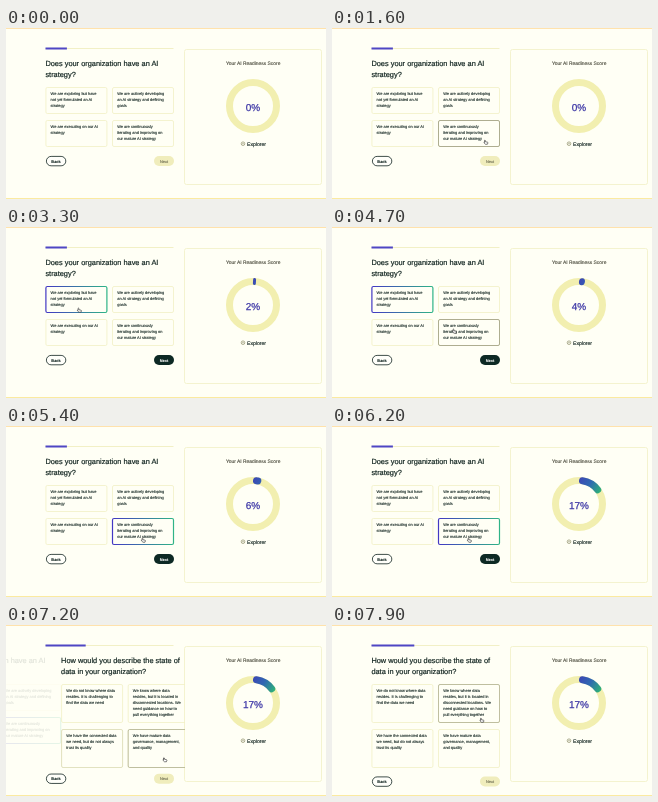
These frames come from a looping animation (320 by 171 pixels, 8 s). An HTML page:

```html
<!DOCTYPE html>
<html lang="en">
<head>
<meta charset="utf-8">
<title>AI readiness quiz</title>
<style>
html, body { margin: 0; width: 100%; height: 100%; overflow: hidden; background: #fffff5; }
svg { display: block; width: 100%; height: 100%; }
text { font-family: "Liberation Sans", Arial, sans-serif; text-rendering: geometricPrecision; }
</style>
</head>
<body>
<svg id="stage" viewBox="0 0 320 171">
  <defs>
    <linearGradient id="edge"><stop stop-color="#4338c4"/><stop offset="1" stop-color="#2fb487"/></linearGradient>
    <linearGradient id="arc" gradientUnits="userSpaceOnUse" x1="247" y1="52" x2="268" y2="65">
      <stop stop-color="#3d45b4"/><stop offset=".5" stop-color="#2f68b2"/><stop offset="1" stop-color="#2eae7c"/>
    </linearGradient>
    <clipPath id="left"><rect width="179" height="171"/></clipPath>
  </defs>
  <g id="scene"></g>
</svg>
<script>
const LOOP = 8000, SLIDE = 128.5, INK = '#10231f', PALE = '#f2f0c6';
const scene = document.getElementById('scene');

const questions = [
  { title: ['Does your organization have an AI', 'strategy?'], height: 27, options: [
    ['We are exploring but have', 'not yet formulated an AI', 'strategy'],
    ['We are actively developing', 'an AI strategy and defining', 'goals'],
    ['We are executing on our AI', 'strategy'],
    ['We are continuously', 'iterating and improving on', 'our mature AI strategy']] },
  { title: ['How would you describe the state of', 'data in your organization?'], height: 39, options: [
    ['We do not know where data', 'resides. It is challenging to', 'find the data we need'],
    ['We know where data', 'resides, but it is located in', 'disconnected locations. We', 'need guidance on how to', 'pull everything together'],
    ['We have the connected data', 'we need, but do not always', 'trust its quality'],
    ['We have mature data', 'governance, management,', 'and quality']] }
];

// Pointer stops: time, x, y
const stops = [
  [600, 298, 134], [1300, 152.5, 112], [1700, 152.5, 112], [2400, 72, 81],
  [3800, 72, 81], [4600, 121, 102], [4800, 121, 102], [5200, 136, 112],
  [6300, 136, 112], [6650, 157.5, 132.5], [7400, 157.5, 132.5], [7900, 148.5, 93]
];

const ramp = (t, a, b) => Math.min(1, Math.max(0, (t - a) / (b - a)));
const ease = u => u * u * (3 - 2 * u);
const slideAt = t => ease(ramp(t, 6900, 7285));

function pointer(t) {
  if (t < stops[0][0]) return null;
  const i = stops.findIndex(s => s[0] > t);
  if (i < 0) return stops[stops.length - 1].slice(1);
  const [a, b] = [stops[i - 1], stops[i]], u = ease(ramp(t, a[0], b[0]));
  return [a[1] + (b[1] - a[1]) * u, a[2] + (b[2] - a[2]) * u];
}

const boxAt = (q, i) => ({ x: i % 2 ? 106 : 39.4, y: 59 + (i > 1 ? q.height + 6 : 0) });

// Share of the last moments the pointer spent over an option
function hover(t, q, i, index) {
  const { x, y } = boxAt(q, i);
  let sum = 0;
  for (let k = 0; k < 4; k++) {
    const p = pointer(t - 40 * k);
    if (!p) continue;
    const dx = p[0] - x - SLIDE * (index - slideAt(t - 40 * k)), dy = p[1] - y;
    if (dx > 0 && dx < 62 && dy > 0 && dy < q.height) sum++;
  }
  return sum / 4;
}

// A thin outline in the text colour gives a medium weight
const text = (x, y, size, str, fill = INK, attrs = '') =>
  `<text x="${x}" y="${y}" font-size="${size}" fill="${fill}" stroke="${fill}" stroke-width="${size * .025}" ${attrs}>${str}</text>`;
const rect = (x, y, w, h, attrs) => `<rect x="${x}" y="${y}" width="${w}" height="${h}" ${attrs}/>`;
const lines = (list, x, y, step, size) => list.map((s, i) => text(x, y + i * step, size, s)).join('');
const MID = 'text-anchor="middle"';

function question(t, index, picked) {
  const q = questions[index], p = slideAt(t), alpha = index ? Math.min(1, p * 1.25) : 1 - p;
  if (!alpha) return '';
  const options = q.options.map((label, i) => {
    const { x, y } = boxAt(q, i);
    const frame = attrs => rect(x + .5, y + .5, 61, q.height - 1, `rx="1.5" fill="none" ${attrs}`);
    const border = i === picked ? frame('stroke="url(#edge)" stroke-width="1.2"')
      : frame(`stroke="${PALE}" stroke-width=".8"`) +
        frame(`stroke="#9c9c80" stroke-width=".8" opacity="${hover(t, q, i, index)}"`);
    return border + lines(label, x + 5.2, y + 8.3, 6, 3.94);
  }).join('');
  return `<g opacity="${alpha}" transform="translate(${SLIDE * (index - p)})">` +
    lines(q.title, 39.4, 37.5, 11, 7.4) + options + '</g>';
}

function buttons(t) {
  const y = 128 + 23.5 * slideAt(t), on = t > 3000 && t < 6900;
  const label = (x, s, fill, weight) => text(x, y + 6.5, 3.9, s, fill, `${MID} font-weight="${weight}"`);
  return rect(40.4, y + .4, 19.4, 9.4, `rx="4.7" fill="#fffffa" stroke="${INK}" stroke-width=".8"`) +
    label(50, 'Back', INK, 700) +
    rect(148, y, 20, 10, `rx="5" fill="${on ? '#0d2924' : '#f0edbc'}"`) +
    label(158, 'Next', on ? '#fff' : '#66664c', on ? 700 : 400);
}

// Ring segment with rounded corners
function segment(share) {
  const R = 23.5, len = share * 2 * Math.PI * R;
  if (len < .1) return '';
  const k = Math.min(3.4, len / 2 - .02), out = R + 3.5 - k, inn = R - 3.5 + k;
  const at = (r, s) => `${247 + r * Math.sin(s / R)} ${78 - r * Math.cos(s / R)}`;
  return `<path d="M${at(out, k)}A${out} ${out} 0 0 1 ${at(out, len - k)}L${at(inn, len - k)}A${inn} ${inn} 0 0 0 ${at(inn, k)}Z"
    fill="url(#arc)" stroke="url(#arc)" stroke-width="${2 * k}" stroke-linejoin="round"/>`;
}

function panel(t) {
  const score = 4 * ramp(t, 2950, 3650) + 13 * ramp(t, 5300, 6100);
  return rect(178.5, 21.5, 137, 135, `rx="2" fill="none" stroke="${PALE}" stroke-width=".8"`) +
    text(247.2, 37, 4.93, 'Your AI Readiness Score', '#4a4a3c', MID) +
    '<circle cx="247" cy="78" r="23.5" fill="none" stroke="#f2efb0" stroke-width="7"/>' +
    segment(score / 100) +
    text(247, 83, 10, Math.round(score) + '%', '#3d37a6', MID) +
    '<circle cx="237" cy="115.7" r="1.8" fill="none" stroke="#8f8f68" stroke-width=".7"/><circle cx="237" cy="115.7" r=".6" fill="#8f8f68"/>' +
    text(241, 117.6, 5.1, 'Explorer');
}

function hand(t) {
  const p = pointer(t);
  return p ? `<path transform="translate(${p}) scale(.85)" d="M0 .5Q.5-.4 1 .5V2L3.6 2.6Q4.2 2.8 4 3.6L3.4 5H1.2L-.8 3.1Q-.7 2.3 0 2.8Z"
    fill="#fff" stroke="#222" stroke-width=".7" stroke-linejoin="round"/>` : '';
}

function draw(now) {
  const t = now % LOOP;
  const picked = t < 2950 ? -1 : t < 5300 ? 0 : 3;
  scene.innerHTML =
    rect(0, 0, 320, 1, 'fill="#ffe2ac"') + rect(0, 170, 320, 1, 'fill="#fbeaa0"') +
    panel(t) +
    rect(39.5, 20, 128, 1, `fill="${PALE}"`) +
    rect(39.5, 19.5, 21.4 * (1 + slideAt(t)), 2, 'fill="#4f46c4"') +
    `<g clip-path="url(#left)">${question(t, 0, picked)}${question(t, 1, -1)}</g>` +
    buttons(t) + hand(t);
  requestAnimationFrame(draw);
}
requestAnimationFrame(draw);
</script>
</body>
</html>
```
